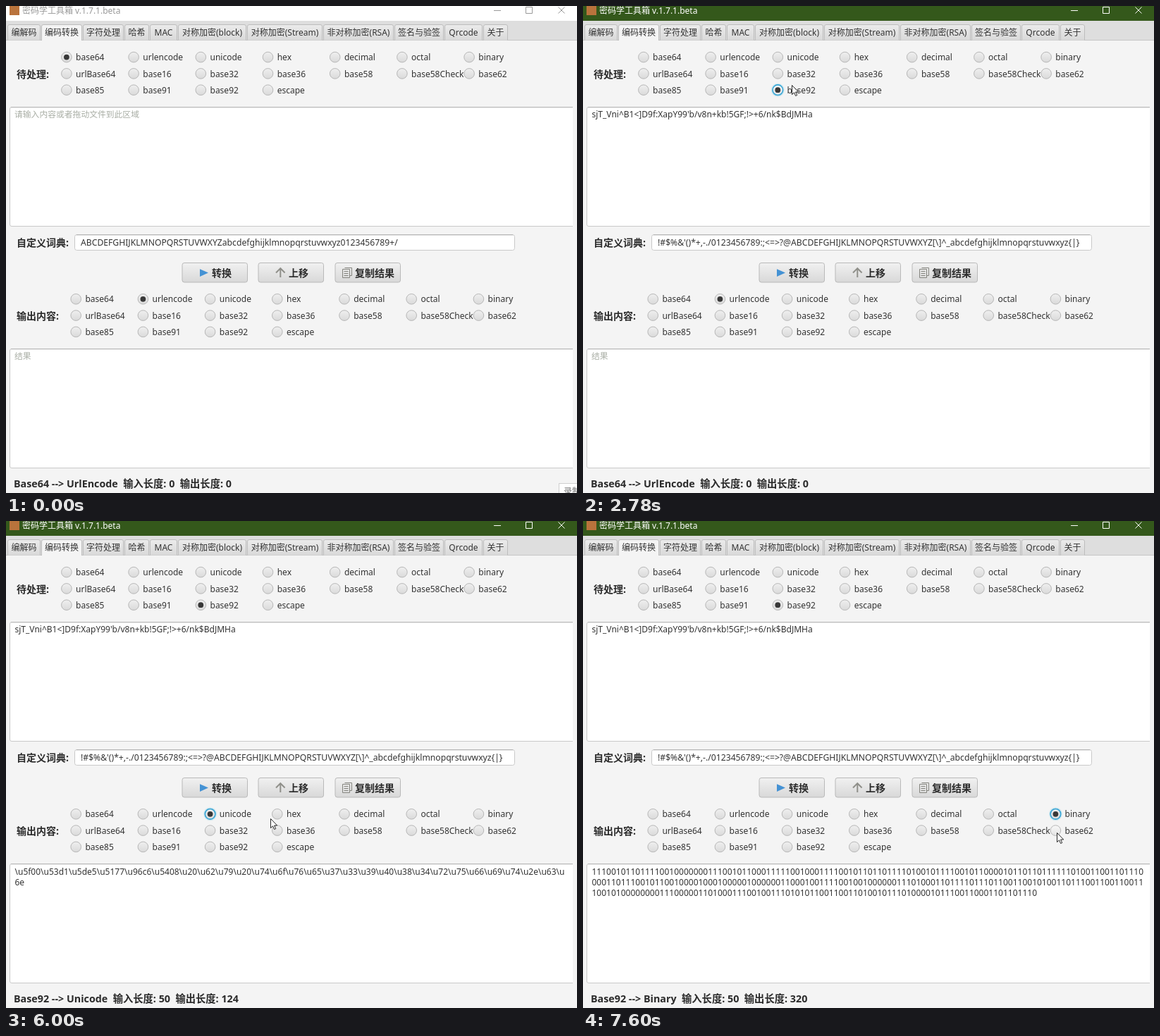
An HTML page for the animation above (8000 ms loop, 810x691 px).

```html
<!DOCTYPE html>
<html lang="zh-CN">
<head>
<meta charset="utf-8">
<title>密码学工具箱</title>
<style>
html, body { margin: 0; width: 100%; height: 100%; overflow: hidden; background: #f4f4f4; }
svg { display: block; width: 810px; height: 691px; }
text {
  font: 12px 'Noto Sans', 'Noto Sans CJK SC', 'Noto Sans CJK', sans-serif;
  fill: #333; white-space: pre;
}
.bold { font-size: 14px; font-weight: 700; fill: #2b2b2b; }
.status { font-size: 14.3px; }
.dict { font-size: 12.18px; }
.out { word-spacing: .03em; }
.prompt { font-size: 11.8px; fill: #a9aea5; }
.mid { text-anchor: middle; }
.box { fill: #fff; stroke: #c9c9c9; }
.btn { fill: url(#btn); stroke: #b9b9b9; }
.ring { fill: url(#radio); stroke: #b6b6b6; }
.hover .ring { fill: url(#lit); }
.dot { fill: #383838; visibility: hidden; }
.on .dot { visibility: visible; }
.glow { fill: none; stroke: #039ed3; stroke-opacity: .15; stroke-width: 2; visibility: hidden; }
.focus .glow { visibility: visible; }
.focus .ring { stroke: #35a5d6; stroke-width: 1.6; }
</style>
</head>
<body>
<svg id="stage" viewBox="0 0 810 691">
  <defs>
    <linearGradient id="tab" x2="0" y2="1"><stop stop-color="#ebebeb"/><stop offset="1" stop-color="#d9d9d9"/></linearGradient>
    <linearGradient id="btn" x2="0" y2="1"><stop stop-color="#f1f1f1"/><stop offset="1" stop-color="#d8d8d8"/></linearGradient>
    <linearGradient id="radio" x2="0" y2="1"><stop stop-color="#efefef"/><stop offset="1" stop-color="#dadada"/></linearGradient>
    <linearGradient id="lit" x2="0" y2="1"><stop stop-color="#f8f8f8"/><stop offset="1" stop-color="#e4e4e4"/></linearGradient>
  </defs>
</svg>
<script>
const LOOP = 8000;
const stage = document.getElementById('stage');

function el(tag, attrs, parent = stage) {
  const node = document.createElementNS('http://www.w3.org/2000/svg', tag);
  for (const key in attrs) node.setAttribute(key, attrs[key]);
  return parent.appendChild(node);
}
function text(x, y, str, cls = '', parent = stage) {
  const node = el('text', { x, y, class: cls }, parent);
  node.textContent = str;
  return node;
}
const rect = (x, y, width, height, attrs, parent) => el('rect', { x, y, width, height, ...attrs }, parent);
const path = (d, attrs, parent) => el('path', { d, ...attrs }, parent);
const show = (node, on) => node.setAttribute('visibility', on ? 'visible' : 'hidden');

// Conversions
const range = (a, b) => Array.from({ length: b - a + 1 }, (_, i) => String.fromCharCode(a + i)).join('');
const upper = range(65, 90), lower = range(97, 122);
const dict64 = upper + lower + '0123456789+/';
const dict92 = '!' + range(35, 95) + range(97, 125);

const plain = '开发工具集合 by tove739@84rufit.cn';
const bytes = [...new TextEncoder().encode(plain)];
const codes = (radix, sep) => [...plain].map(c => sep + c.codePointAt(0).toString(radix)).join('');
const bits = bytes.map(b => b.toString(2).padStart(8, '0')).join('');
const base92 = bits.match(/.{1,13}/g).map(chunk => {
  const n = parseInt(chunk.padEnd(13, '0'), 2);
  return dict92[n / 91 | 0] + dict92[n % 91];
}).join('');
const results = [
  ['Base64', btoa(String.fromCharCode(...bytes))],
  ['UrlEncode', encodeURIComponent(plain).replace(/%20/g, '+')],
  ['Unicode', codes(16, '\\u'), 122],
  ['Hex', bytes.map(b => b.toString(16).padStart(2, '0')).join('')],
  ['Decimal', codes(10, ' ').trim()],
  ['Octal', codes(8, ' ').trim()],
  ['Binary', bits, 114]
];

// Title bar
const bar = rect(0, 0, 810, 21);
rect(5, 0, 14, 13, { fill: '#b9733c' });
const title = text(23, 11, '密码学工具箱 v.1.7.1.beta');
const controls = path('M692 6.5H702M737.5 1.5h9v9h-9zM783.5 1.5l9 9m0-9l-9 9', { fill: 'none' });

// Tabs
rect(0, 21, 810, 28, { fill: '#dedede' });
path('M0 48.5H810', { stroke: '#c6c6c6' });
[['编解码', 2, 48], ['编码转换', 50, 107], ['字符处理', 109, 166], ['哈希', 168, 202], ['MAC', 204, 242],
 ['对称加密(block)', 244, 340], ['对称加密(Stream)', 342, 448], ['非对称加密(RSA)', 450, 549],
 ['签名与验签', 551, 620], ['Qrcode', 622, 675], ['关于', 677, 711]].forEach(([name, a, b], i) => {
  const open = i === 1;
  path(`M${a + .5} ${open ? 49 : 48.5}V29q0-2.5 2.5-2.5H${b - 2}q2.5 0 2.5 2.5V${open ? 49 : 48.5}`,
    { fill: open ? '#f4f4f4' : 'url(#tab)', stroke: '#bdbdbd' });
  text((a + b) / 2 + .5, 42.4, name, 'mid');
});

// Radio groups
const names = ('base64 urlencode unicode hex decimal octal binary urlBase64 base16 base32 base36 ' +
  'base58 base58Check base62 base85 base91 base92 escape').split(' ');
function radios(x, y) {
  return names.map((name, i) => {
    const cx = x + i % 7 * 95.2, cy = y + (i / 7 | 0) * 23.3;
    const node = el('g', {});
    el('circle', { cx, cy, r: 8.5, class: 'glow' }, node);
    el('circle', { cx, cy, r: 7.3, class: 'ring' }, node);
    el('circle', { cx, cy, r: 3.9, class: 'dot' }, node);
    text(cx + 13.2, cy + 4.6, name, '', node);
    return { node, cx, cy };
  });
}
text(15, 102, '待处理:', 'bold');
const from = radios(85.9, 72.6);
text(15, 341, '自定义词典:', 'bold');
text(15, 445, '输出内容:', 'bold');
const to = radios(99.2, 415.8);

// Text areas
function area(y) {
  path(`M804 ${y + .5}H8q-2.5 0-2.5 2.5v164q0 2.5 2.5 2.5H804`, { class: 'box' });
  path(`M7 ${y + .5}H804`, { stroke: '#b9b9b9' });
  path(`M7 ${y + 1.5}H804`, { stroke: '#ececec' });
}
area(143);
area(486);
const prompt = text(12, 158.3, '请输入内容或者拖动文件到此区域', 'prompt');
const input = text(12.5, 158.4, base92);
const hint = text(12, 501, '结果', 'prompt');
const lines = [0, 1, 2].map(i => text(12.5, 501.5 + i * 15, '', 'out'));

// Dictionary field
rect(97.5, 324.5, 624, 22, { rx: 3, class: 'box' });
path('M100 324.5H719', { stroke: '#b4b4b4' });
path('M99 325.5H720', { stroke: '#e8e8e8' });
const dict = text(106, 340.3, '', 'dict');

// Buttons
[[250, 292, '转换'], [358, 401, '上移'], [467, 495, '复制结果']].forEach(([x, tx, name]) => {
  rect(x, 364.5, 92.5, 27.5, { rx: 3, class: 'btn' });
  text(tx, 384, name, 'bold');
});
path('M275 373.2L287 378.6L275 384z', { fill: '#4492d4' });
path('M389.3 385V372.5M383 378.5l6.3-6.3l6.3 6.3', { fill: 'none', stroke: '#90908a', 'stroke-width': 2 });
path('M480.5 371.5h10v11h-2.5M477.5 373.5h10v12h-10zM479.5 376.5h6m-6 3h6m-6 3h6', { fill: 'none', stroke: '#84847e' });

const status = text(11, 683, '', 'bold status');

const tip = el('g', {});
rect(784.5, 677.5, 40, 30, { fill: '#fff', stroke: '#cfcfcf' }, tip);
text(791, 693, '录制', '', tip).style.fill = '#777';

const arrow = path('M.5 .5V13.6L3.5 10.8L5.6 15.5L7.7 14.6L5.6 10H9.7z', { fill: '#fff', stroke: '#111', 'stroke-width': .9 });
const beam = path('M0 .5h2.5q1 0 1 1q0-1 1-1H7M3.5 1.5v13M0 15.5h2.5q1 0 1-1q0 1 1 1H7', { fill: 'none', stroke: '#222' });

// Each step changes the state that went before it
const steps = [
  [0, { tip: true, filled: false, active: false, src: 0, dst: 1, focus: '', done: false, at: null, beam: false }],
  [390, { tip: false }],
  [1580, { filled: true, at: [240, 226] }],
  [1970, { at: [335, 179], beam: true }],
  [2380, { at: [325, 128], beam: false }],
  [2780, { active: true, src: 16, focus: 'src', at: [296, 112] }],
  [3190, { at: [282, 142] }],
  [3590, { at: [186, 313] }],
  [3990, { at: [108, 423] }],
  [4380, { dst: 0, focus: 'dst', done: true }],
  [4800, { at: [124, 427] }],
  [5200, { at: [199, 419] }],
  [5600, { dst: 1, at: [289, 419] }],
  [6000, { dst: 2, at: [375, 422] }],
  [6400, { dst: 3, at: [473, 420] }],
  [6800, { dst: 4, at: [572, 420] }],
  [7200, { dst: 5, at: [672, 418] }],
  [7600, { dst: 6, at: [672, 442] }]
];

function markRadios(group, chosen, focused, at) {
  group.forEach(({ node, cx, cy }, i) => {
    const over = at && at[0] > cx - 8 && at[0] < cx + 60 && Math.abs(at[1] - cy) < 8;
    node.setAttribute('class', [i === chosen && 'on', i === chosen && focused && 'focus', over && 'hover'].filter(Boolean).join(' '));
  });
}

function render(s) {
  bar.setAttribute('fill', s.active ? '#34581b' : '#fff');
  title.style.fill = s.active ? '#fff' : '#999';
  controls.setAttribute('stroke', s.active ? '#fff' : '#999');
  show(tip, s.tip);
  show(prompt, !s.filled);
  show(input, s.filled);
  show(hint, !s.done);
  dict.textContent = s.src ? dict92 : dict64;
  markRadios(from, s.src, s.focus === 'src', s.at);
  markRadios(to, s.dst, s.focus === 'dst', s.at);

  const [name, value, wrap = 200] = results[s.dst];
  lines.forEach((line, i) => line.textContent = s.done ? value.slice(i * wrap, (i + 1) * wrap) : '');
  const [inLen, outLen] = s.done ? [base92.length, value.length] : [0, 0];
  status.textContent = `${s.done ? 'Base92' : 'Base64'} --> ${name}  输入长度: ${inLen}  输出长度: ${outLen}`;

  show(arrow, s.at && !s.beam);
  show(beam, s.at && s.beam);
  if (s.at) (s.beam ? beam : arrow).setAttribute('transform', `translate(${s.at})`);
}

let shown = -1;
function tick() {
  const t = performance.now() % LOOP;
  const count = steps.filter(([start]) => start <= t).length;
  if (count !== shown) {
    shown = count;
    render(Object.assign({}, ...steps.slice(0, count).map(step => step[1])));
  }
  requestAnimationFrame(tick);
}
tick();
</script>
</body>
</html>
```
